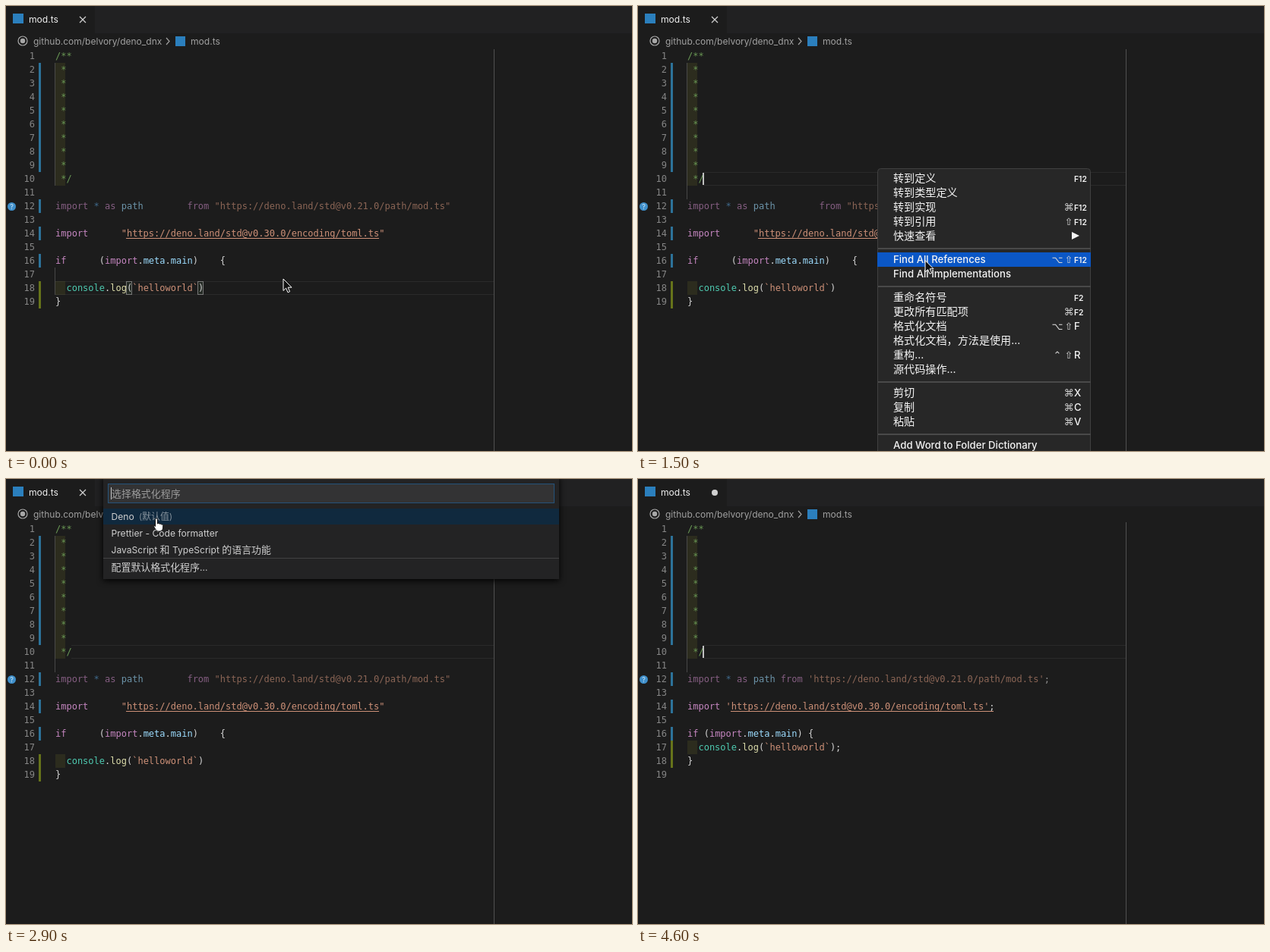
An HTML page for the animation above (4.7 s loop, 824 px wide and 587 px high).

```html
<!DOCTYPE html>
<html lang="en">
<head>
<meta charset="utf-8">
<title>Editor: format document</title>
<style>
  html, body { margin: 0; width: 100%; height: 100%; overflow: hidden; background: #1c1c1c; }
  svg { display: block; }
  text { white-space: pre; fill: #d4d4d4; }
  .code { font: 12px "DejaVu Sans Mono", monospace; }
  .ui { font-family: Inter, "Noto Sans CJK SC", "Noto Sans CJK", sans-serif; }
  .key { font-family: "DejaVu Sans", sans-serif; }
  .k { fill: #c586c0; } .b { fill: #569cd6; } .v { fill: #9cdcfe; }
  .s { fill: #ce9178; } .f { fill: #dcdcaa; } .c { fill: #4ec9b0; }
  .g { fill: #6a9955; } .n { fill: #858585; }
</style>
</head>
<body>
<svg id="stage" width="824" height="587" viewBox="0 0 824 587"></svg>
<script>
const LOOP = 4700, STEP = 100;
const MENU_OPEN = 800, MENU_CLICK = 2100, MENU_GONE = 2500;
const PICK_OPEN = 2600, PICK_CLOSE = 3800, FORMATTED = 4400;
const BLUE = '#2c7299', OLIVE = '#66731a';

// Pointer path: time, x, y
const PATH = [
  [0, 365, 360], [600, 314, 213], [800, 314, 213], [1100, 351, 230],
  [1900, 405, 441], [2100, 405, 441], [2300, 393, 426], [2900, 198, 52],
  [3700, 198, 52], [4000, 269, 182], [4700, 269, 182]
];

const rect = (x, y, w, h, fill, more = '') =>
  `<rect x="${x}" y="${y}" width="${w}" height="${h}" fill="${fill}" ${more}/>`;
const group = (id, body) => `<g id="${id}">${body}</g>`;
const rowTop = row => 39 + 18 * row;

// Chinese runs are set slightly larger than Latin ones
function ui(x, y, str, size, fill, more = '') {
  const body = str.replace(/[\u3000-\u9fff\uff00-\uffef]+/g,
    run => `<tspan font-size="${size * 1.07}">${run}</tspan>`);
  return `<text class="ui" x="${x}" y="${y}" font-size="${size}" style="fill:${fill}" ${more}>${body}</text>`;
}

// Parts alternate between colour class and text
function code(row, parts, more = '') {
  let body = '';
  for (let i = 0; i < parts.length; i += 2)
    body += `<tspan class="${parts[i]}">${parts[i + 1]}</tspan>`;
  return `<text class="code" x="65" y="${rowTop(row) + 13}" ${more}>${body}</text>`;
}

const bar = (row, rows, fill) => rect(43, rowTop(row), 3, 18 * rows, fill);
const indent = (row, rows) => rect(65, rowTop(row), 13, 18 * rows, '#ffff40', 'opacity=".07"');
const guide = (row, rows) => rect(64, rowTop(row), 1, 18 * rows, '#484848');
const rowFrame = (row, x) =>
  rect(x, rowTop(row), 642 - x, 1, '#2a2a2a') + rect(x, rowTop(row) + 17, 642 - x, 1, '#2a2a2a');
const underline = (x, end, y) => rect(x, y, end - x, 1, '#ce9178');

const PATH_URL = 'https://deno.land/std@v0.21.0/path/mod.ts';
const TOML_URL = 'https://deno.land/std@v0.30.0/encoding/toml.ts';

// Everything that depends on spacing, quotes and semicolons
function program(gaps, quote, end) {
  const [from, url, cond, brace] = gaps.map(n => ' '.repeat(n));
  const log = end ? 17 : 18;
  return code(12, ['k', 'import ', 'b', '* ', 'k', 'as ', 'v', 'path' + from, 'k', 'from ',
      's', quote + PATH_URL + quote, 'w', end], 'opacity=".62"')
    + code(14, ['k', 'import' + url, 's', quote + TOML_URL + quote, 'w', end])
    + code(16, ['k', 'if' + cond, 'w', '(', 'k', 'import', 'w', '.', 'v', 'meta', 'w', '.',
      'v', 'main', 'w', ')' + brace + '{'])
    + code(log, ['c', '  console', 'w', '.', 'f', 'log', 'w', '(', 's', '`helloworld`', 'w', ')' + end])
    + code(log + 1, ['w', '}'])
    + indent(log, 1) + bar(log, 2, OLIVE);
}

function editor() {
  let out = rect(0, 0, 824, 587, '#1c1c1c') + rect(117, 0, 707, 36, '#212122')
    + rect(9, 10, 14, 13, '#2b7fbd') + ui(30, 22, 'mod.ts', 12.1, '#f0f0f0')
    + '<circle cx="22" cy="46" r="6" fill="none" stroke="#a8a8a8" stroke-width="1.2"/>'
    + '<circle cx="22" cy="46" r="3.2" fill="#a8a8a8"/>'
    + ui(36, 51, 'github.com/belvory/deno_dnx', 12, '#a0a0a0')
    + '<path d="M211 42l4 4.5-4 4.5" fill="none" stroke="#a0a0a0" stroke-width="1.2"/>'
    + rect(223, 40, 13, 13, '#2b7fbd') + ui(243, 51, 'mod.ts', 12.1, '#a0a0a0')
    + rect(642, 57, 1, 530, '#505050');

  for (let row = 1; row <= 19; row++)
    out += `<text class="code n" x="38" y="${rowTop(row) + 13}" text-anchor="end">${row}</text>`;
  out += indent(2, 9) + guide(2, 9) + bar(2, 8, BLUE);
  for (const row of [12, 14, 16]) out += bar(row, 1, BLUE);
  out += '<circle cx="7.5" cy="264.5" r="5.5" fill="#3f8fca"/>'
    + ui(7.5, 268, '?', 9, '#d8ecfa', 'text-anchor="middle"');
  for (let row = 1; row <= 10; row++)
    out += code(row, ['g', row == 1 ? '/**' : row == 10 ? ' */' : ' *']);

  const bracket = x => rect(x, rowTop(18) + .5, 7, 17, '#242a24', 'stroke="#777"');
  return out
    + group('line18', rowFrame(18, 65) + guide(17, 2) + bracket(158.5) + bracket(252.5))
    + group('line10', rowFrame(10, 86) + guide(10, 2))
    + group('before', program([8, 6, 6, 4], '"', '') + underline(158, 491, 306)
      + '<path d="M97 14l8 8M105 14l-8 8" stroke="#d0d0d0" stroke-width="1.2"/>')
    + group('after', program([1, 1, 1, 1], "'", ';') + underline(122, 468, 306)
      + '<circle cx="101" cy="18" r="4" fill="#d0d0d0"/>')
    + group('caret', rect(85, 220, 2, 16, '#c0c0c0'));
}

// Row centre, label, modifiers, key
const ITEMS = [
  [227, '转到定义', '', 'F12'], [246, '转到类型定义'], [265, '转到实现', '⌘', 'F12'],
  [284, '转到引用', '⇧', 'F12'], [303, '快速查看'],
  [334, 'Find All References', '⌥⇧', 'F12'], [353, 'Find All Implementations'],
  [384, '重命名符号', '', 'F2'], [403, '更改所有匹配项', '⌘', 'F2'], [422, '格式化文档', '⌥⇧', 'F'],
  [441, '格式化文档，方法是使用...'], [460, '重构...', '⌃⇧', 'R'], [479, '源代码操作...'],
  [510, '剪切', '⌘', 'X'], [529, '复制', '⌘', 'C'], [548, '粘贴', '⌘', 'V'],
  [579, 'Add Word to Folder Dictionary']
];

function contextMenu() {
  let out = rect(315.5, 214.5, 280, 380, '#272727', 'rx="4" stroke="#404040"')
    + rect(315, 0, 281, 19, '#0b57c6', 'id="hover"');
  for (const y of [319, 369, 495, 564]) out += rect(316, y, 280, 2, '#494949');
  for (const [y, label, mods = '', key = ''] of ITEMS) {
    out += ui(336, y + 5, label, 13.2, '#f4f4f4', 'font-weight="500"');
    [...mods].reverse().forEach((mod, i) => {
      out += `<text class="key" x="${567 - 15 * i}" y="${y + 5}" font-size="13" text-anchor="middle">${mod}</text>`;
    });
    if (key) out += key.length > 1
      ? ui(574, y + 5, key, 10.3, '#f4f4f4', 'font-weight="600"')
      : ui(574, y + 5, key, 13.2, '#f4f4f4', 'font-weight="500"');
  }
  return out + '<path d="M571 298l10 5-10 5z" fill="#f4f4f4"/>';
}

function quickPick() {
  const row = (y, str) => ui(138.5, y + 5, str, 12.1, '#cfcfcf');
  return rect(128, -4, 600, 136, '#232324', 'style="filter:drop-shadow(0 2px 4px #000)"')
    + rect(134.5, 6.5, 587, 25, '#333334', 'stroke="#24527a"')
    + rect(138, 11, 1, 16, '#c8c8c8') + ui(139, 24, '选择格式化程序', 12.1, '#9c9c9c')
    + rect(128, 39, 600, 21, '#10293e') + rect(128, 104, 600, 1, '#424243')
    + row(49, 'Deno') + ui(175, 54, '(默认值)', 11.2, '#87939d')
    + row(71, 'Prettier - Code formatter') + row(93, 'JavaScript 和 TypeScript 的语言功能')
    + row(116, '配置默认格式化程序...');
}

const CURSORS =
  '<path id="arrow" d="M0 0v15.5l3.6-3.4 2.4 5.7 2.6-1.1-2.4-5.5h4.8z" fill="#111" stroke="#fff"/>'
  + '<path id="hand" d="M-1.5 1.5c0-2 3-2 3 0V7c1-1 2.5-.6 2.8.4 1-.7 2.2-.2 2.4.8 1-.5 2 0 2 1.2V12c0 3-2 5-5 5-3 0-4-1-6-4.5-1.2-2-1.2-3-.2-3l1 1z" fill="#fff" stroke="#111"/>'
  + '<path id="beam" d="M-3-8q3 0 3 2q0-2 3-2M0-6V6M-3 8q3 0 3-2q0 2 3 2M-1.5 2h3" fill="none" stroke="#eee" stroke-width="1.3"/>';

const stage = document.getElementById('stage');
stage.innerHTML = editor() + group('menu', contextMenu())
  + group('picker', quickPick()) + group('pointer', CURSORS);

const el = id => document.getElementById(id);
const show = (id, on) => el(id).setAttribute('visibility', on ? 'inherit' : 'hidden');

function pointerAt(t) {
  const i = PATH.findIndex(p => p[0] > t);
  const [t0, x0, y0] = PATH[i - 1], [t1, x1, y1] = PATH[i];
  const u = (t - t0) / (t1 - t0), ease = u * u * (3 - 2 * u);
  return [x0 + (x1 - x0) * ease, y0 + (y1 - y0) * ease];
}

function draw(t) {
  const [x, y] = pointerAt(t);
  const picking = t >= PICK_OPEN && t < PICK_CLOSE;
  const done = t >= FORMATTED;

  show('line18', t < MENU_OPEN);
  show('line10', t >= MENU_OPEN);
  show('caret', t >= MENU_OPEN && t < PICK_OPEN || done);
  show('before', !done);
  show('after', done);

  show('menu', t >= MENU_OPEN && t < MENU_GONE);
  el('menu').setAttribute('opacity', Math.min(1, 1 - (t - 2130) / 300));
  const hoverY = pointerAt(Math.min(t, MENU_CLICK))[1];
  const item = ITEMS.find(([mid]) => Math.abs(mid - hoverY) <= 9.5);
  el('hover').setAttribute('y', item ? item[0] - 9 : 600);

  show('picker', picking);
  const hand = picking && y < 132, beam = t >= PICK_CLOSE;
  show('pointer', !done);
  el('pointer').setAttribute('transform', `translate(${x} ${y})`);
  for (const [id, on] of [['arrow', !hand && !beam], ['hand', hand], ['beam', beam]])
    el(id).style.display = on ? '' : 'none';
}

function tick() {
  const t = performance.now() % LOOP;
  draw(Math.floor(t / STEP) * STEP);
  requestAnimationFrame(tick);
}
tick();
</script>
</body>
</html>
```
